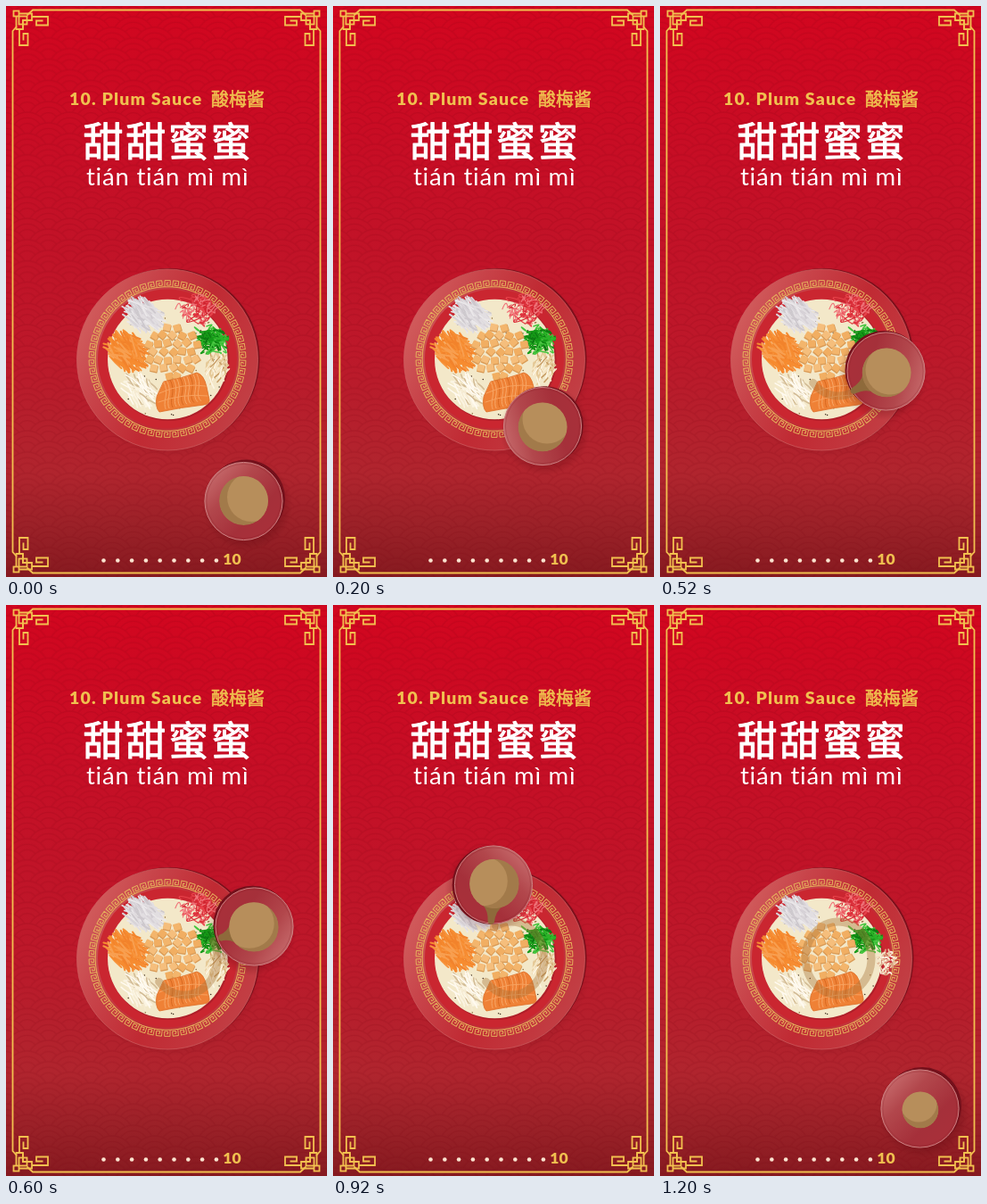
These frames come from a looping animation (360 px wide and 640 px high, 1.4 s). An HTML page:

```html
<!DOCTYPE html>
<html lang="en">
<head>
<meta charset="utf-8">
<title>Plum Sauce</title>
<style>
html, body { margin: 0; width: 100%; height: 100%; overflow: hidden; background: #b51626; }
svg { display: block; width: 100vw; height: 100vh; }
text { font-family: Lato, "Noto Sans CJK SC", "Noto Sans CJK", sans-serif; }
.cjk { font-family: "Noto Sans CJK SC", "Noto Sans CJK", "Noto Sans CJK JP", sans-serif; stroke-linejoin: round; }
</style>
</head>
<body>
<svg viewBox="0 0 360 640" xmlns="http://www.w3.org/2000/svg">
  <defs>
    <linearGradient id="sky" x2="0" y2="1">
      <stop offset="0" stop-color="#d2061f"/>
      <stop offset=".3" stop-color="#c50f26"/>
      <stop offset=".6" stop-color="#bd182a"/>
      <stop offset=".82" stop-color="#b0252e"/>
      <stop offset=".91" stop-color="#9b2128"/>
      <stop offset="1" stop-color="#861a20"/>
    </linearGradient>
    <linearGradient id="plate" x1="0" y1=".25" x2="1" y2=".75">
      <stop offset="0" stop-color="#d2605f"/>
      <stop offset=".25" stop-color="#c8444a"/>
      <stop offset=".55" stop-color="#c02a33"/>
      <stop offset=".8" stop-color="#c2363d"/>
      <stop offset="1" stop-color="#c24247"/>
    </linearGradient>
    <linearGradient id="well" x1="0" y1="0" x2="1" y2="1">
      <stop offset=".08" stop-color="#c96f70"/>
      <stop offset=".35" stop-color="#b2474c"/>
      <stop offset=".65" stop-color="#a5303a"/>
      <stop offset="1" stop-color="#ab303a"/>
    </linearGradient>
    <radialGradient id="shade">
      <stop offset=".7" stop-color="#4a0008" stop-opacity=".3"/>
      <stop offset="1" stop-color="#4a0008" stop-opacity="0"/>
    </radialGradient>
    <pattern id="scales" width="34" height="17" patternUnits="userSpaceOnUse" patternTransform="scale(1.4)"></pattern>
    <mask id="waves"><rect width="360" height="640" fill="url(#scales)"/></mask>
    <clipPath id="pool"><circle id="poolEdge"/></clipPath>
    <g id="corner" fill="none" stroke="#f2c04f" stroke-width="1.8">
      <path d="M180 4.5H30L23.5 10.5M7.5 320V28L12 23"/>
      <g transform="translate(3 0)">
        <rect x="5.5" y="5.5" width="6" height="6"/>
        <rect x="11.5" y="11.5" width="9" height="9"/>
        <g id="arm"><path d="M11.5 8.5H26V16H16V26M26 12H44V21.5H31V16.5H38.5"/></g>
        <use href="#arm" transform="matrix(0 1 1 0 0 0)"/>
      </g>
    </g>
  </defs>

  <rect width="360" height="640" fill="url(#sky)"/>
  <rect width="360" height="640" fill="#74000f" opacity=".13" mask="url(#waves)"/>

  <use href="#corner"/>
  <use href="#corner" transform="matrix(-1 0 0 1 360 0)"/>
  <use href="#corner" transform="matrix(1 0 0 -1 0 640)"/>
  <use href="#corner" transform="matrix(-1 0 0 -1 360 640)"/>

  <g fill="#f0c04f">
    <text x="145.7" y="111" font-size="19.5" font-weight="900" letter-spacing="1.15" text-anchor="middle">10. Plum Sauce</text>
    <text class="cjk" x="230" y="111.5" font-size="20" stroke="#f0c04f" stroke-width=".6">酸梅酱</text>
    <text x="253.5" y="626" font-size="17.5" font-weight="900" text-anchor="middle">10</text>
  </g>
  <text class="cjk" x="182" y="168.5" font-size="45" font-weight="400" letter-spacing="2.8" text-anchor="middle"
    fill="#fff" stroke="#fff" stroke-width="1.1">甜甜蜜蜜</text>
  <text x="181.2" y="201" font-size="27.5" font-weight="400" letter-spacing=".8" text-anchor="middle" fill="#fff">tián tián mì mì</text>
  <g id="dots" fill="#fbe3cf"></g>

  <circle cx="185" cy="400" r="106" fill="url(#shade)"/>
  <circle cx="183" cy="395.5" r="101.5" fill="#7d0f1b"/>
  <circle cx="181" cy="396.5" r="101.5" fill="url(#plate)" stroke="#cf6162" stroke-width=".7"/>
  <circle cx="181" cy="395.5" r="78" fill="#ca2630"/>
  <g id="fret" fill="none" stroke="#e6b45c" stroke-width=".95"></g>
  <circle cx="182.5" cy="397" r="68" fill="#9f1b25" opacity=".6"/>
  <circle cx="181.3" cy="396" r="67.3" fill="#f3e8c9"/>
  <g id="food" fill="none" stroke-linecap="round"></g>
  <path id="trail" fill="none" stroke="#a8743a" stroke-opacity=".4" stroke-width="9" stroke-linecap="round"/>

  <g id="bowl">
    <circle id="soft" r="51" fill="url(#shade)"/>
    <circle id="back" r="44" fill="#74101b"/>
    <circle r="43.6" fill="url(#well)" stroke="#cb8081" stroke-width="1"/>
    <circle r="41.6" fill="none" stroke="#84212a" stroke-width=".7" opacity=".4"/>
  </g>
  <path id="pour" fill="#8e6a3b"/>
  <g clip-path="url(#pool)">
    <circle id="sauce" fill="#a27a4a"/>
    <circle id="shine" fill="#b78e5b"/>
  </g>
</svg>
<script>
const $ = id => document.getElementById(id);
const set = (el, attrs) => { for (const k in attrs) el.setAttribute(k, attrs[k]); return el; };
const add = (parent, tag, attrs) =>
  parent.appendChild(set(document.createElementNS("http://www.w3.org/2000/svg", tag), attrs));

let seed = 7;
const rnd = () => (seed = seed * 16807 % 2147483647) / 2147483647;
const spread = r => (rnd() * 2 - 1) * r;
const pick = list => list[Math.floor(rnd() * list.length)];
const inOval = (cx, cy, rx, ry) => {
  const a = rnd() * Math.PI * 2, r = Math.sqrt(rnd());
  return [cx + Math.cos(a) * r * rx, cy + Math.sin(a) * r * ry];
};

// overlapping fish-scale waves
for (let row = 0; row < 5; row++)
  for (const x of row % 2 ? [0, 34] : [-17, 17, 51])
    for (const r of [17, 12.5, 8])
      add($("scales"), "circle", { cx: x, cy: row * 8.5, r, fill: "#000", stroke: "#fff", "stroke-width": .9 });

for (let i = 0; i < 9; i++) add($("dots"), "circle", { cx: 109.5 + i * 15.8, cy: 621.5, r: 2.3 });

// key pattern around the plate
for (let i = 0; i < 58; i++)
  add($("fret"), "path", {
    d: "M-4.5 3.6H-3V-3.6H3.3V1.8H-.6V-.9H1.2M-3 3.6H4.6",
    transform: `translate(181 395.5) rotate(${i * 360 / 58}) translate(0 -84.3)`
  });

function shreds(parent, { at, size, angle, fan, len, n, colors, width }) {
  for (let i = 0; i < n; i++) {
    const [x, y] = inOval(...at, ...size);
    const a = (angle + spread(fan)) * Math.PI / 180, h = len * (.6 + rnd() * .4) / 2;
    const dx = Math.cos(a) * h, dy = Math.sin(a) * h;
    add(parent, "path", {
      d: `M${x - dx} ${y - dy}Q${x + spread(2)} ${y + spread(2)} ${x + dx} ${y + dy}`,
      stroke: pick(colors), "stroke-width": width
    });
  }
}

function curls(parent, at, size, n, colors, width) {
  for (let i = 0; i < n; i++) {
    const [x, y] = inOval(...at, ...size);
    add(parent, "path", {
      d: `M${x} ${y}q${spread(8)} ${spread(8)} ${spread(7)} ${spread(6)}t${spread(7)} ${spread(6)}`,
      stroke: pick(colors), "stroke-width": width
    });
  }
}

const food = $("food");
for (let i = 0; i < 60; i++) {
  const a = rnd() * Math.PI * 2, r = 66 * Math.sqrt(rnd());
  add(food, "circle", { cx: 181 + Math.cos(a) * r, cy: 396 + Math.sin(a) * r, r: .75, fill: pick(["#3c2b1c", "#8d6a3c"]) });
}
shreds(food, { at: [154, 347], size: [17, 14], angle: 42, fan: 28, len: 24, n: 150,
  colors: ["#e2dee1", "#d8d3d8", "#ebe8ea", "#cdc8cd"], width: 1.7 });
shreds(food, { at: [150, 430], size: [15, 15], angle: 48, fan: 28, len: 20, n: 75,
  colors: ["#fbf4e2", "#f5ead0", "#d2bb95", "#fffaf0"], width: 1.6 });
shreds(food, { at: [136, 387], size: [18, 18], angle: 42, fan: 35, len: 23, n: 170,
  colors: ["#f68b30", "#f7943c", "#f2832c", "#f89f50"], width: 2 });

const sticks = add(food, "g", {}), crumbs = add(food, "g", {});
shreds(sticks, { at: [236, 407], size: [12, 17], angle: 100, fan: 38, len: 16, n: 60,
  colors: ["#f7e8c8", "#e5c997", "#fdf6e4", "#c79c63"], width: 1.5 });
shreds(crumbs, { at: [254, 401], size: [11, 13], angle: 80, fan: 90, len: 6, n: 46,
  colors: ["#f5e3c8", "#e9c7a5", "#fdf2e2", "#d9a583"], width: 1.8 });
curls(food, [217, 339], [18, 15], 62, ["#e8434b", "#d92b36", "#f0757a"], 1.15);
curls(food, [231, 374], [12, 10], 85, ["#169a18", "#2bb428", "#0d7d12", "#45c53e"], 1.5);

// diced crackers in staggered rows
for (let row = 0; row < 7; row++)
  for (let col = 0; col < 6; col++) {
    const x = 161 + col * 10.5 + row % 2 * 5 + spread(1.5), y = 360 + row * 9.2 + spread(1.4);
    if (((x - 188) / 29) ** 2 + ((y - 387) / 31) ** 2 > 1) continue;
    const cube = add(food, "g", { transform: `translate(${x} ${y}) rotate(${spread(45)})` });
    add(cube, "rect", { x: -4, y: -3.4, width: 8.6, height: 8.2, rx: .8, fill: "#d99a55" });
    add(cube, "rect", { x: -4.2, y: -4.2, width: 8, height: 7.6, rx: .8, fill: pick(["#f3b56c", "#f1ae62", "#f5be7c"]) });
  }

// sliced salmon
add(food, "path", {
  d: "M177 421Q198 417 214 411Q222 413 225 427L228 441Q229 446 222 447Q196 450 172 455Q167 450 169 438Z",
  fill: "#ef8136", stroke: "#dd6d25", "stroke-width": .8
});
for (let i = 0; i < 11; i++) {
  const cut = i % 3 === 2;
  add(food, "path", {
    d: `M${177 + i * 3.7} ${421.5 - i * .9}q4 8 2 17t${i * .25} 13`,
    stroke: cut ? "#d8681f" : "#f8a868", "stroke-width": 1
  });
}
add(food, "path", { d: "M172 434Q198 422 224 426M171 444Q198 434 226 437", stroke: "#f8a25f", "stroke-width": 1 });

// at: bowl, back: rim depth, pool: sauce x y r, shine: light offset, tip: end of the pour, trail: degrees poured
const poses = [
  { at: [266.5, 555], back: [2.6, -2.4], pool: [266.5, 554.5, 27.5], shine: [9, -4], turn: 0, trail: 0 },
  { at: [235, 471], back: [1.8, -.8], pool: [235, 472, 27.5], shine: [5, -9], turn: -60, trail: 0 },
  { at: [253.5, 409.5], back: [-2, -1.6], pool: [254, 411, 27.5], shine: [4, -3], turn: 150, tip: [214, 433], trail: 70 },
  { at: [278.5, 360.5], back: [-2, -1.8], pool: [278, 361, 27.8], shine: [-5, -4], turn: 170, tip: [238, 374], trail: 168 },
  { at: [180, 313.5], back: [-2.4, .4], pool: [181, 312.5, 27.8], shine: [-13, -3], turn: 90, tip: [177, 358], trail: 258 },
  { at: [200, 443], back: [1.4, 1.8], pool: [198, 443, 27.8], shine: [11, -2], turn: -30, tip: [198, 401], trail: 350 },
  { at: [291.5, 564.5], back: [2.6, -2.4], pool: [292, 566, 20.5], shine: [-2, -7], turn: 0, trail: 359 }
];

const ringPoint = deg => {
  const a = deg * Math.PI / 180;
  return `${200 + 37 * Math.cos(a)} ${396 + 41 * Math.sin(a)}`;
};
const trailPath = deg => deg ? `M${ringPoint(140)}A37 41 0 ${deg > 180 ? 1 : 0} 0 ${ringPoint(140 - deg)}` : "";

function pourPath([x, y, r], tip) {
  if (!tip) return "";
  const dx = tip[0] - x, dy = tip[1] - y, d = Math.hypot(dx, dy);
  const at = (along, side) => `${x + (dx * along - dy * side) / d} ${y + (dy * along + dx * side) / d}`;
  return `M${at(r - 4, 12)}Q${at(r + 2, 4)} ${at(d - 2, 3.5)}Q${at(d + 2, 0)} ${at(d - 2, -3.5)}Q${at(r + 2, -4)} ${at(r - 4, -12)}Z`;
}

function draw(ms) {
  const step = Math.floor(ms % 1400 / 200), p = poses[step];
  const [x, y, r] = p.pool, last = step === poses.length - 1;
  set($("bowl"), { transform: `translate(${p.at})` });
  set($("back"), { cx: p.back[0], cy: p.back[1] });
  set($("soft"), { cx: p.back[0] * 1.5, cy: 4 });
  set($("well"), { gradientTransform: `rotate(${p.turn} .5 .5)` });
  for (const id of ["poolEdge", "sauce"]) set($(id), { cx: x, cy: y, r });
  set($("shine"), { cx: x + p.shine[0], cy: y + p.shine[1], r });
  set($("pour"), { d: pourPath(p.pool, p.tip) });
  set($("trail"), { d: trailPath(p.trail) });
  set(sticks, { visibility: last ? "hidden" : "visible" });
  set(crumbs, { visibility: last ? "visible" : "hidden" });
}

const start = performance.now();
function tick() {
  draw(performance.now() - start);
  requestAnimationFrame(tick);
}
tick();
</script>
</body>
</html>
```
